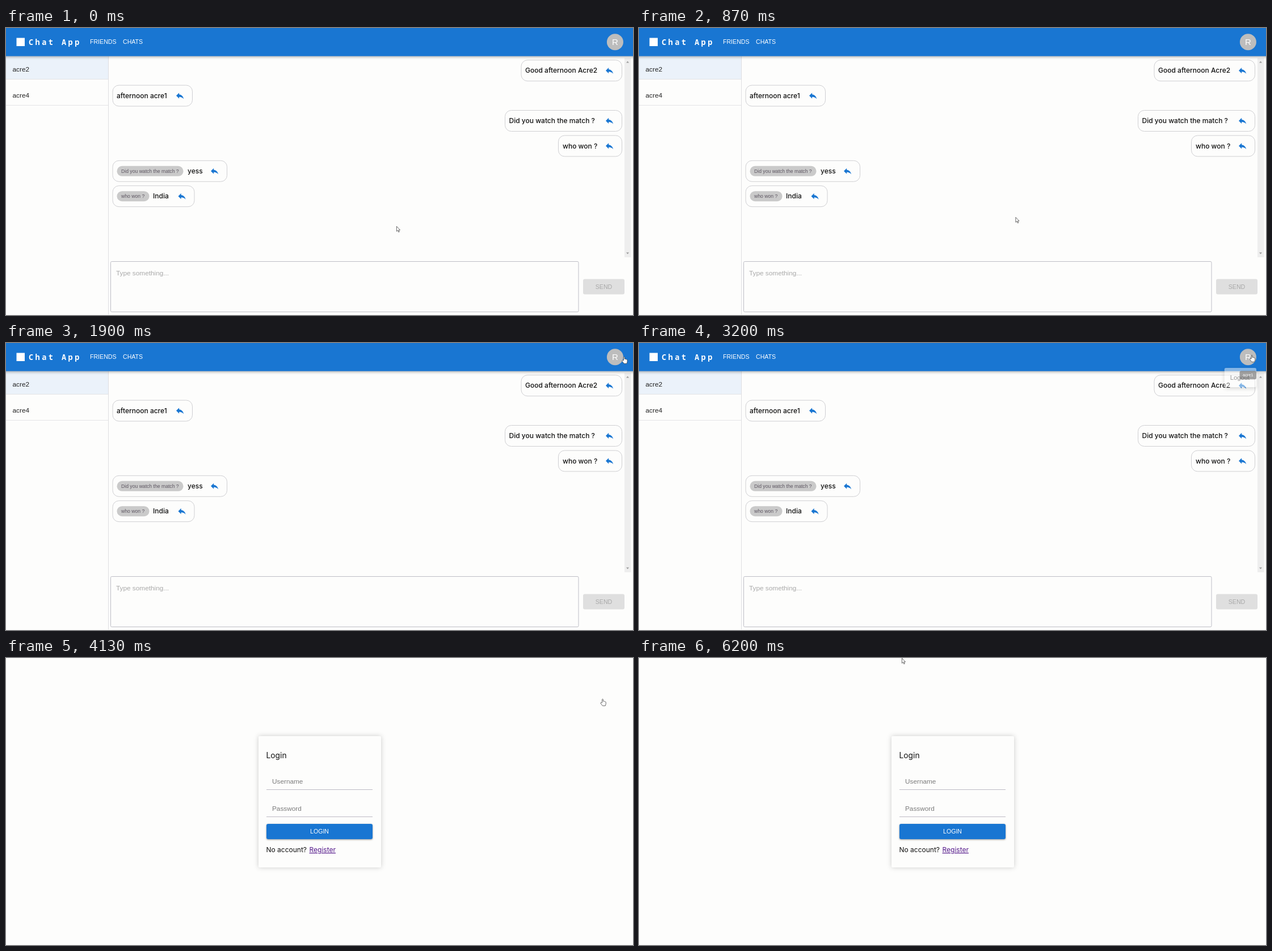
Write an HTML page that moves like this. It is 1105 px wide and 507 px high and loops after 7230 ms.

```html
<!DOCTYPE html>
<html lang="en">
<head>
<meta charset="utf-8">
<title>Chat App</title>
<style>
  html, body { margin: 0; width: 100%; height: 100%; overflow: hidden; background: #fdfdfc; }
  svg { display: block; width: 1105px; height: 507px; }
  text { font: 11.8px "Liberation Sans", Arial, sans-serif; fill: #222; white-space: pre; }
  .btn { font-size: 10.6px; fill: #fff; }
  .msg { font: 500 12px Inter, sans-serif; fill: #111; }
  .card { font: 400 12px Inter, sans-serif; fill: #111; }
  .quote { font-size: 8.65px; fill: #5c5560; }
  .brand { font: 700 13.5px "Noto Sans Mono", monospace; letter-spacing: 3.5px; fill: #fff; }
  .hint { fill: #a9a9a9; }
  .mid { text-anchor: middle; }
  .bubble { fill: #fdfdfc; stroke: #cfcfd2; }
  .line { stroke: #e4e4e6; }
  .bar { filter: drop-shadow(0 2px 2px rgba(0,0,0,.28)); }
  .raised { filter: drop-shadow(0 1px 1.5px rgba(0,0,0,.4)); }
  .paper { filter: drop-shadow(0 3px 4px rgba(0,0,0,.3)); }
  .glow { filter: drop-shadow(0 0 4px rgba(0,0,0,.2)); }
</style>
</head>
<body>
<svg viewBox="0 0 1105 507">
  <defs>
    <path id="reply" d="M10 9V5l-7 7 7 7v-4.1c5 0 8.5 1.6 11 5.1-1-5-4-10-11-11z" fill="#1976d2" transform="scale(.73) translate(-3 -12.5)"/>
  </defs>

  <g id="chat">
    <rect y="50" width="180" height="40" fill="#ebf2fa"/>
    <path class="line" d="M0 90.5H180M0 136.5H180"/>
    <path d="M180.5 50V506" stroke="#dedee2"/>
    <text x="11.5" y="76.5">acre2</text>
    <text x="11.5" y="123">acre4</text>

    <g id="messages"></g>

    <rect x="1090" y="53" width="11.5" height="352" fill="#eeeeee"/>
    <path d="M1093 61.5l2.5-3 2.5 3zM1093 396.500l2.5 3 2.5-3z" fill="#9a9a9a"/>

    <rect x="184.500" y="412.500" width="824.500" height="89" rx="2" fill="none" stroke="#bebec6"/>
    <text class="hint" x="194" y="436.500">Type something...</text>
    <rect x="1017" y="443.500" width="73" height="27" rx="3" fill="#dfdfdf"/>
    <text class="btn mid" x="1053.500" y="460.500" style="fill:#a8a8a8">SEND</text>

    <rect class="bar" x="-10" y="-10" width="1125" height="59.7" fill="#1976d2"/>
    <rect x="18.500" y="17.500" width="14.500" height="14.500" fill="#fff"/>
    <text class="brand" x="40" y="29.500">Chat App</text>
    <text class="btn" x="148" y="28.300">FRIENDS</text>
    <text class="btn" x="206" y="28.300">CHATS</text>
    <circle cx="1073.400" cy="24.700" r="14.500" fill="#bdbdbd"/>
    <text class="mid" x="1073.400" y="30" style="font-size:15px;fill:#fff">R</text>

    <g id="menu">
      <rect class="paper" x="1029" y="44" width="59" height="37" rx="3" fill="#fdfdfd"/>
      <rect id="hover" x="1029" y="50" width="59" height="25.500" fill="#f3f3f3"/>
      <text x="1039.500" y="67">Logout</text>
    </g>
    <g id="tip">
      <rect x="1057" y="48.500" width="32.500" height="16.500" rx="3" fill="#616161" opacity=".92"/>
      <text class="mid" x="1073.300" y="59.500" style="font-size:8.200px;fill:#fff">acre1</text>
    </g>
  </g>

  <g id="login">
    <rect class="glow" x="445" y="138" width="216" height="232" rx="2" fill="#fdfdfc"/>
    <text class="card" x="458.500" y="176.500" style="font-size:13.800px">Login</text>
    <text x="469" y="221.800" style="fill:#7b7b7b">Username</text>
    <text x="469" y="269.800" style="fill:#7b7b7b">Password</text>
    <path d="M459 232.500H646M459 280.500H646" stroke="#bdbac4"/>
    <rect class="raised" x="459" y="293" width="187" height="27" rx="3" fill="#1976d2"/>
    <text class="btn mid" x="552.500" y="310.300">LOGIN</text>
    <text class="card" x="458.500" y="343">No account?</text>
    <text class="card" x="534.500" y="343" style="fill:#551a8b" text-decoration="underline">Register</text>
  </g>

  <g id="cursor" fill="#fff" stroke="#444" stroke-width=".8" stroke-linejoin="round">
    <path id="arrow" d="M.4.4V9.200L2.500 7.400 3.900 10.600 5.300 10 3.900 6.900H6.600Z"/>
    <path id="hand" d="M-.9 7V1Q0-.6.9 1V4.300Q2.200 3.600 2.700 4.800 4 4.200 4.400 5.300 5.600 5 5.700 6.200V9.300L4.700 12.400H-.1L-3.600 8Q-3.500 6.200-2 6.600Z"/>
  </g>
</svg>

<script>
const LOOP = 7230, LOGOUT = 4130;
const $ = id => document.getElementById(id);

// [left, right, text, text x, icon x, quoted text, quote right]
const messages = [
  [908, 1085.5, 'Good afternoon Acre2', 915, 1057],
  [188, 328.5, 'afternoon acre1', 195, 300],
  [879.5, 1085.5, 'Did you watch the match ?', 886.5, 1057],
  [973.5, 1085.5, 'who won ?', 981, 1057],
  [188, 389.5, 'yess', 320, 361],
  [188, 332, 'India', 259, 303.5]
];
const quotes = { 4: ['Did you watch the match ?', 312.5], 5: ['who won ?', 252.5] };

$('messages').innerHTML = messages.map(([left, right, text, x, icon], i) => {
  const y = 75.2 + i * 44.4;
  let quote = '';
  if (quotes[i]) {
    const [words, end] = quotes[i];
    quote = `<rect x="195.500" y="${y - 9}" width="${end - 195.5}" height="18" rx="9" fill="#cacaca"/>
      <text class="quote" x="203" y="${y + 3.2}">${words}</text>`;
  }
  return `<rect class="bubble" x="${left}" y="${y - 18.5}" width="${right - left}" height="37" rx="11"/>
    ${quote}<text class="msg" x="${x}" y="${y + 4.2}">${text}</text>
    <use href="#reply" x="${icon}" y="${y + .3}"/>`;
}).join('');

// Pointer path: [time, x, y]
const path = [
  [200, 688, 350], [570, 663.5, 334], [870, 663.5, 334],
  [1870, 1088.5, 24], [2200, 1079, 21], [3300, 1079, 21],
  [3690, 1050.5, 72], [4700, 1050.5, 72], [5170, 463, 0]
];

const ramp = (t, start, length) => {
  const p = Math.min(1, Math.max(0, (t - start) / length));
  return p * p * (3 - 2 * p);
};

function pointer(t) {
  let [, x, y] = path[0];
  for (let i = 1; i < path.length; i++) {
    const [t0, x0, y0] = path[i - 1], [t1, x1, y1] = path[i];
    const p = ramp(t, t0, t1 - t0);
    x += (x1 - x0) * p;
    y += (y1 - y0) * p;
  }
  return [x, y];
}

function fade(id, opacity, sx, sy, ox, oy) {
  $(id).setAttribute('opacity', opacity);
  $(id).setAttribute('transform', `translate(${ox} ${oy}) scale(${sx} ${sy}) translate(${-ox} ${-oy})`);
}

const show = (id, on) => $(id).setAttribute('display', on ? 'inline' : 'none');

function draw(now) {
  const t = now % LOOP, [x, y] = pointer(t);
  show('chat', t < LOGOUT);
  show('login', t >= LOGOUT);

  const grow = ramp(t, 3085, 160);
  fade('menu', ramp(t, 3085, 240), .75 + .25 * grow, .5625 + .4375 * grow, 1088, 44);
  show('hover', y > 50 && t > 3300);

  const tip = ramp(t, 1990, 225) * (1 - ramp(t, 3120, 195));
  const size = .75 + .25 * tip;
  fade('tip', tip, size, size, 1073.4, 56.5);

  const hand = t < 4715 && (t > 3085 || Math.hypot(x - 1073.4, y - 24.7) < 16);
  show('hand', hand);
  show('arrow', !hand);
  $('cursor').setAttribute('transform', `translate(${x + (hand ? 1 : 0)} ${y})`);
}

function tick() {
  draw(performance.now());
  requestAnimationFrame(tick);
}
tick();
</script>
</body>
</html>
```
